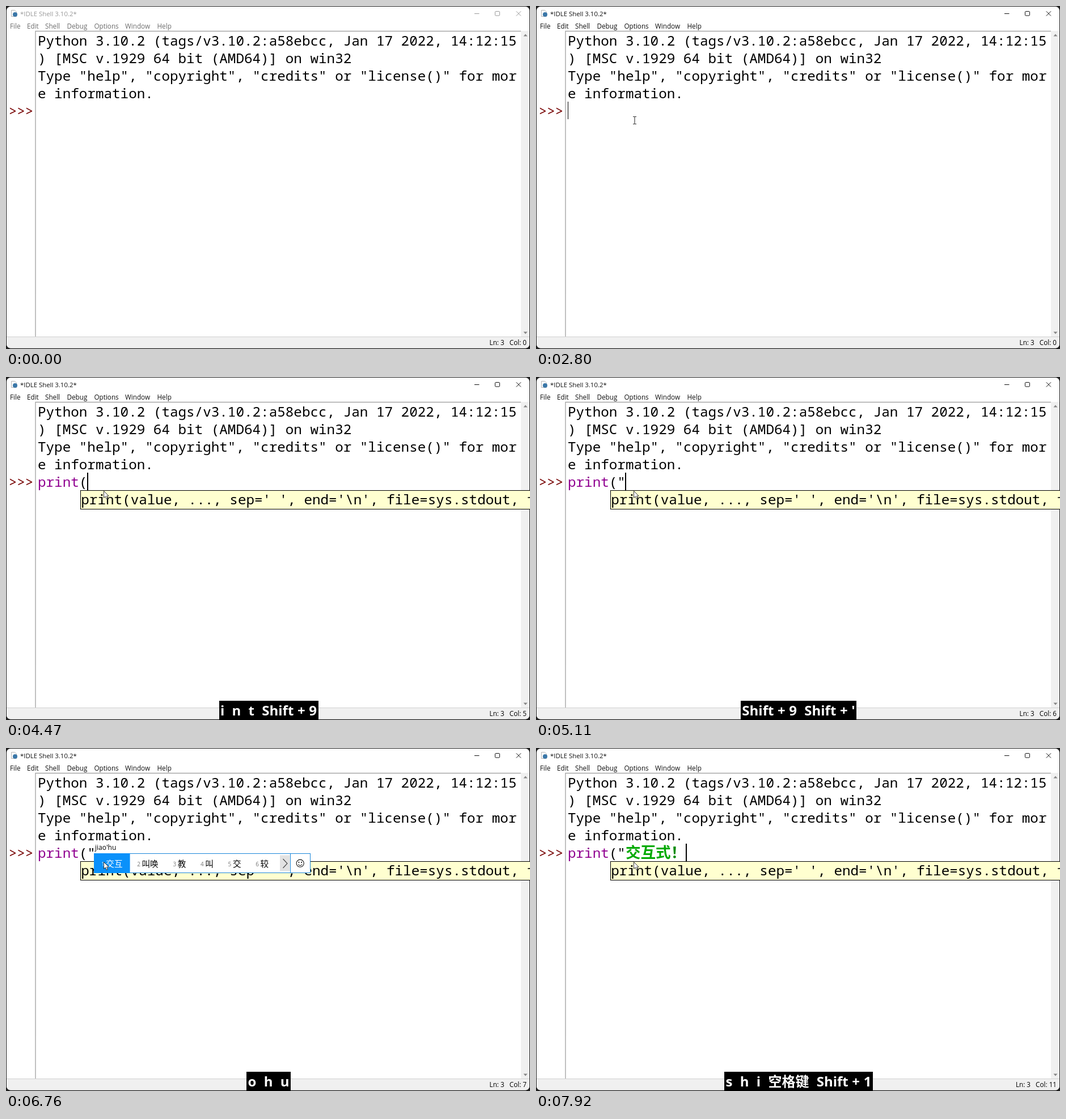
An HTML page that plays this animation: 924 by 606 pixels, repeating every 8 s.

```html
<!DOCTYPE html>
<html lang="zh-CN">
<head>
<meta charset="utf-8">
<title>Shell typing</title>
<style>
  html, body { margin: 0; width: 100%; height: 100%; overflow: hidden; background: #1e1e1e; }
  svg { display: block; width: 924px; height: 606px; }
  text { white-space: pre; }
  .mono { font: 24.27px "Noto Sans Mono", "DejaVu Sans Mono", monospace; }
  .ui { font: 11.7px "Open Sans", "Noto Sans", sans-serif; }
  .title { font-size: 11.4px; }
  .keys { font: 700 24px "Open Sans", "Noto Sans CJK SC", sans-serif; word-spacing: .4px; fill: #fff; }
  .han { font: 700 26.6px "Noto Sans CJK SC", sans-serif; fill: #00aa00; }
  .cand { font: 14.6px "Noto Sans CJK SC", sans-serif; }
  .num { font: 10px "Open Sans", sans-serif; fill: #777; }
  .comp { font: 500 12px "Open Sans", "Noto Sans", sans-serif; }
</style>
</head>
<body>
<svg id="stage" viewBox="0 0 924 606" xmlns="http://www.w3.org/2000/svg">
  <rect width="924" height="606" fill="#1e1e1e"/>
  <clipPath id="win"><rect x="1" y="1" width="922" height="603.5" rx="7"/></clipPath>
  <g clip-path="url(#win)">
    <rect width="924" height="606" fill="#fff"/>
    <rect x="908" y="44" width="16" height="540" fill="#f0f0f0"/>
    <rect y="584" width="924" height="22" fill="#f0f0f0"/>
    <path d="M0 584.5H924" stroke="#d2d2d2"/>
    <path d="M908 44.5H52V584" fill="none" stroke="#a6a6a6" stroke-width="1.4"/>
    <path d="M912.5 53.5L916 49.5L919.5 53.5ZM912.5 575.5L916 579.5L919.5 575.5Z" fill="#858585"/>
  </g>
  <path d="M9.5 7.5H15.5L18.5 10.5V18.5H9.5Z" fill="#fff" stroke="#b4b4b4"/>
  <circle cx="16" cy="15" r="4" fill="#3b77a8"/>
  <g id="bar">
    <text class="ui title" x="25" y="17.5">*IDLE Shell 3.10.2*</text>
    <path d="M826 13.5H834.5M899.8 9.3L908 17.5M908 9.3L899.8 17.5" fill="none" stroke="currentColor"/>
    <rect x="862.5" y="9.5" width="8" height="7.5" rx="1.2" fill="none" stroke="currentColor"/>
  </g>
  <g id="menu" class="ui"></g>
  <g id="banner" class="mono"></g>
  <text class="mono" x="4.7" y="194" fill="#770000">&gt;&gt;&gt;</text>
  <text class="mono" x="56" y="194"><tspan id="word"></tspan><tspan id="rest"></tspan></text>
  <text class="han" x="157.9" y="193.5"><tspan id="han"></tspan><tspan id="bang" fill="#008a00"></tspan></text>
  <rect id="caret" y="169" height="31"/>
  <g id="tip">
    <rect x="131.5" y="200.5" width="820" height="33" fill="#ffffd0" stroke="#000"/>
    <text class="mono" x="132.3" y="225">print(value, ..., sep=' ', end='\n', file=sys.stdout, flush=False)</text>
  </g>
  <g id="ime">
    <rect id="compBox" x="157" y="169" height="14" fill="#fff"/>
    <text id="comp" class="comp" x="157" y="180"></text>
    <rect id="compCaret" x="157" y="183" width="2" height="3"/>
    <rect x="155.5" y="186.5" width="381" height="34" fill="#fff" stroke="#1a86d9"/>
    <clipPath id="list"><rect x="155" y="186" width="346" height="35"/></clipPath>
    <g id="cands" clip-path="url(#list)"></g>
    <rect x="483" y="189.5" width="17.5" height="28" fill="#d8d8d8" fill-opacity=".75"/>
    <path d="M488.5 196L496 204L488.5 212" fill="none" stroke="#444" stroke-width="1.1"/>
    <path d="M501.5 187V220" stroke="#1a86d9"/>
    <g fill="none" stroke="#111" stroke-width="1.1">
      <circle cx="518.7" cy="203.7" r="6.6"/>
      <path d="M515.2 205.5Q518.7 210 522.2 205.5"/>
    </g>
    <path d="M515.5 201h1.8v1.8h-1.8zM520.2 201h1.8v1.8h-1.8z"/>
  </g>
  <g id="beam" fill="none">
    <path d="M-3 -6.5H-.8L0 -6L.8 -6.5H3M0 -6V6M-3 6.5H-.8L0 6L.8 6.5H3" stroke="#333" stroke-width="1.1"/>
  </g>
  <path id="arrow" d="M172.5 201.5V213.5L175.3 211L177.2 215.4L179.3 214.5L177.5 210.2H181.2Z"
        fill="#fff" stroke="#222" stroke-width=".9"/>
  <g id="osd">
    <rect id="osdBox" y="572" height="34"/>
    <text id="keys" class="keys" text-anchor="middle" x="463"></text>
  </g>
  <g class="ui">
    <text id="line" y="599" text-anchor="end" x="918"></text>
  </g>
</svg>
<script>
const LOOP = 8000, STEP = 130, PITCH = 14.56, HAN = 26.6;
const $ = id => document.getElementById(id);
const show = (id, on) => $(id).setAttribute('display', on ? 'inline' : 'none');
const set = (id, attrs) => { for (const k in attrs) $(id).setAttribute(k, attrs[k]); };

function addText(parent, x, y, str, attrs = {}) {
  const el = document.createElementNS('http://www.w3.org/2000/svg', 'text');
  el.textContent = str;
  for (const [k, v] of Object.entries({ x, y, ...attrs })) el.setAttribute(k, v);
  parent.append(el);
}

const menu = { File: 7, Edit: 37, Shell: 69, Debug: 107.5, Options: 155.5, Window: 210, Help: 266.5 };
for (const name in menu) addText($('menu'), menu[name], 39.5, name);

[
  'Python 3.10.2 (tags/v3.10.2:a58ebcc, Jan 17 2022, 14:12:15',
  ') [MSC v.1929 64 bit (AMD64)] on win32',
  'Type "help", "copyright", "credits" or "license()" for mor',
  'e information.'
].forEach((row, i) => addText($('banner'), 56, 70 + 31 * i, row));

const start = {
  bar: false, menu: false, text: '', purple: false, han: '', caret: false,
  keys: '', lift: false, col: 0, tip: false, comp: '', cands: '', tail: false
};

// Each entry changes part of the state from its time on.
const events = [
  [1790, { bar: true, caret: true }],
  [1920, { menu: true }],
  [2420, { caret: false }],
  [2800, { caret: true }],
  [3180, { text: 'p', keys: 'p', lift: true }],
  [3310, { lift: false }],
  [3440, { col: 1 }],
  [3820, { text: 'pri', keys: 'p i', lift: true }],
  [3950, { text: 'prin', keys: 'p r i n', lift: false, col: 3 }],
  [4080, { text: 'print', keys: 'p r i n t', col: 4 }],
  [4210, { purple: true, col: 5 }],
  [4340, { text: 'print(', keys: 'r i n t Shift+9' }],
  [4470, { tip: true, keys: 'i n t Shift+9' }],
  [4600, { col: 6, keys: 'n t Shift+9', caret: false }],
  [4730, { keys: 't Shift+9', caret: true }],
  [4860, { keys: 'Shift+9' }],
  [5110, { text: 'print("', keys: "Shift+9 Shift+'" }],
  [5240, { col: 7 }],
  [5370, { keys: "Shift+'", caret: false }],
  [5620, { comp: 'j', cands: '就 见 叫 加 几 将 季', keys: "Shift+' j", tail: true }],
  [5750, { comp: 'ji', cands: '几 级 及 机 记 季 集', keys: "Shift+' j i a" }],
  [6000, { comp: 'jia', cands: '教 叫 交 较 ∩ ∠ 吉奥', keys: "Shift+' j i a o", lift: true }],
  [6130, { comp: 'jiao', keys: 'j i a o', lift: false }],
  [6380, { tail: false }],
  [6630, { comp: "jiao'h", cands: '教会 交换 叫好 交汇 较好', keys: 'a o h' }],
  [6760, { comp: "jiao'hu", cands: '交互 叫唤 教 叫 交 较', keys: 'o h u' }],
  [6890, { comp: "jiao'hu's", cands: '交互式 交互 教 叫 交', keys: 'h u s' }],
  [7020, { comp: "jiao'hu'sh", keys: 'h u s h' }],
  [7150, { comp: "jiao'hu'shi", keys: 'h u s h i' }],
  [7280, { comp: '', keys: 'h u s h i 空格键', caret: true }],
  [7410, { han: '交互式', col: 10, caret: false }],
  [7540, { han: '交互式！', col: 11, keys: 'h u s h i 空格键 Shift+1' }],
  [7790, { caret: true, keys: 'u s h i 空格键 Shift+1' }],
  [7920, { keys: 's h i 空格键 Shift+1' }]
];

function drawCands(list) {
  const g = $('cands');
  g.replaceChildren();
  if (!list) return;
  let x = 155;
  list.split(' ').forEach((word, i) => {
    const width = /[∩∠]/.test(word) ? 10.6 : 14.6 * word.length;
    const first = i === 0;
    if (first) {
      const bg = document.createElementNS('http://www.w3.org/2000/svg', 'rect');
      for (const [k, v] of Object.entries({ x, y: 186, width: width + 34.4, height: 35, fill: '#0a91fa' }))
        bg.setAttribute(k, v);
      g.append(bg);
    }
    addText(g, x + 13, 209, i + 1, { class: 'num', style: first ? 'fill:#cfe8ff' : '' });
    addText(g, x + 21.3, 209.5, word, { class: 'cand', fill: first ? '#fff' : '#000' });
    x += width + 34;
  });
}

function drawKeys(s) {
  show('osd', s.keys);
  if (!s.keys) return;
  $('keys').textContent = s.keys.split(' ').join('  ').replace(/\+/g, ' + ');
  set('keys', { y: s.lift ? 595.5 : 598 });
  const width = Math.round($('keys').getComputedTextLength() + 5);
  set('osdBox', { x: Math.round(463 - width / 2), width });
}

function drawState(s) {
  set('bar', { fill: s.bar ? '#111' : '#999', color: s.bar ? '#111' : '#999' });
  set('menu', { fill: s.menu ? '#111' : '#6d6d6d' });
  $('word').textContent = s.text.slice(0, 5);
  set('word', { fill: s.purple ? '#900090' : '#000' });
  $('rest').textContent = s.text.slice(5);
  $('han').textContent = s.han.slice(0, 3);
  $('bang').textContent = s.han.slice(3);
  show('caret', s.caret);
  set('caret', {
    x: Math.floor(56 + s.text.length * PITCH + s.han.length * HAN),
    width: s.text ? 2 : 1
  });
  show('tip', s.tip);
  show('ime', s.comp);
  $('comp').textContent = s.comp;
  set('compBox', { width: s.comp.length * 5 + 4 });
  show('compCaret', s.tail);
  drawCands(s.comp && s.cands);
  drawKeys(s);
  $('line').textContent = `Ln: 3   Col: ${s.col}`;
  show('arrow', s.tip);
}

function drawBeam(t, tip) {
  show('beam', t >= 880 && !tip);
  const p = Math.min(1, Math.max(0, Math.floor((t - 880) / STEP) / 6));
  const e = 1 - (1 - p) ** 2;
  set('beam', { transform: `translate(${515.5 + (174 - 515.5) * e} ${559 + (202 - 559) * e})` });
}

let shown = -1;
function render(t) {
  const past = events.filter(([at]) => at <= t);
  const state = Object.assign({}, start, ...past.map(e => e[1]));
  if (past.length !== shown) {
    drawState(state);
    shown = past.length;
  }
  drawBeam(t, state.tip);
}

const t0 = performance.now();
function tick() {
  render((performance.now() - t0) % LOOP);
  requestAnimationFrame(tick);
}
tick();
</script>
</body>
</html>
```
